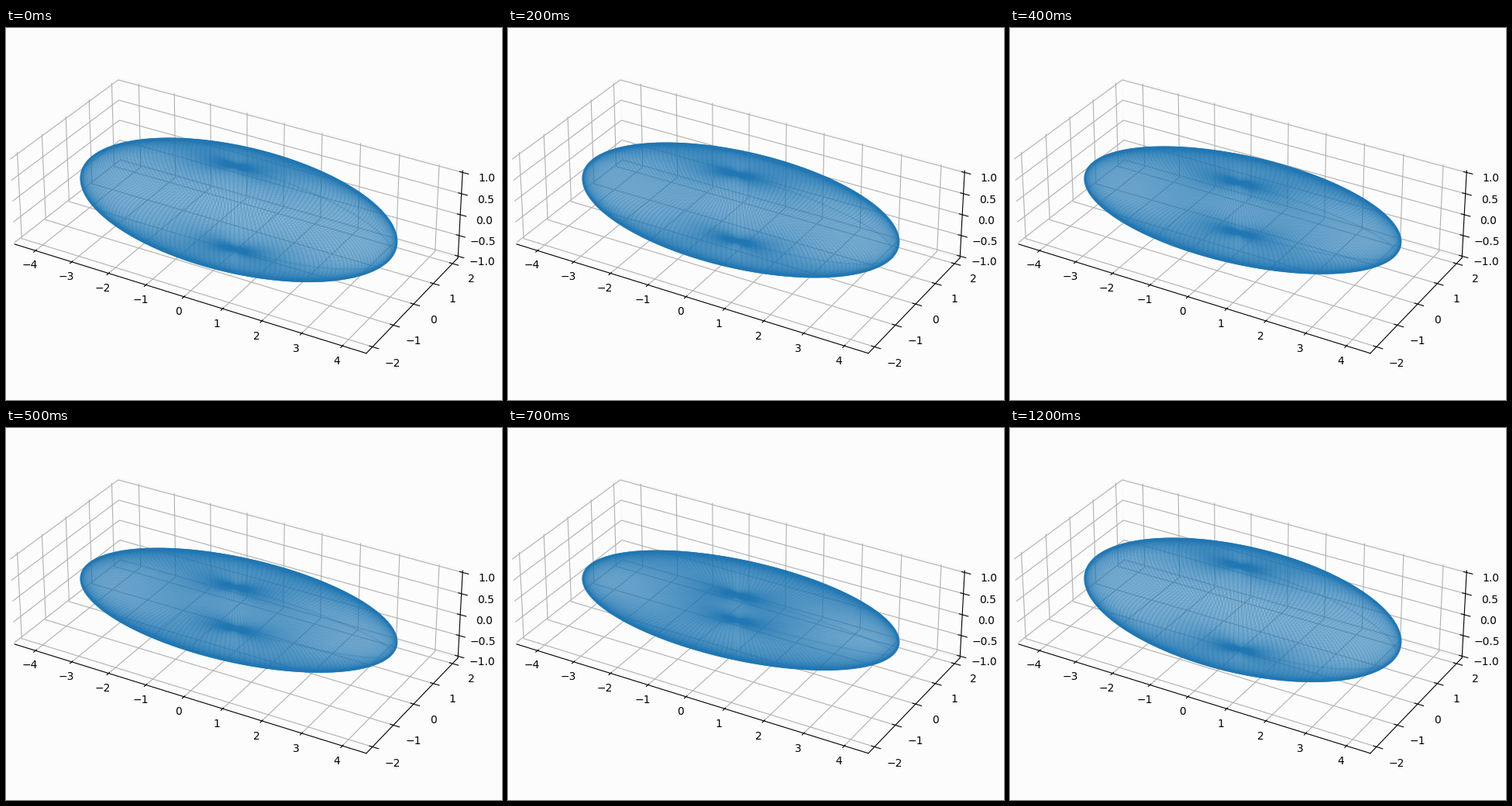
A matplotlib script that plays this animation: 640x480 px, repeating every 1250 ms.

```python
import numpy as np
import matplotlib.pyplot as plt
from matplotlib.animation import FuncAnimation

PAPER = "#fcfcfc"
AXES = (4, 2, 1)        # semi-axes and box proportions
FRAMES, STEP_MS = 25, 50
SHRINK_STEPS = 18       # then the flat shape is held until the last frame
PAD = 25 / 24

fig = plt.figure(figsize=(6.4, 4.8), dpi=100, facecolor=PAPER)
fig.subplots_adjust(left=0, right=0.9, bottom=-0.1, top=1.1)
ax = fig.add_subplot(projection="3d", facecolor=PAPER)
ax.view_init(elev=30, azim=-60)
ax.set_box_aspect(AXES)
ax.set_xlim(-4.4 * PAD, 4.4 * PAD)
ax.set_ylim(-2.2 * PAD, 2.2 * PAD)
ax.set_zlim(-PAD, PAD)
ax.set_xticks(np.arange(-4, 5))
ax.set_yticks(np.arange(-2, 3))
ax.set_zticks(np.arange(-1, 1.5, 0.5))
for axis in (ax.xaxis, ax.yaxis, ax.zaxis):
    axis.pane.set_facecolor(PAPER)
    axis.pane.set_edgecolor("#f2f2f2")

u = np.linspace(0, 2 * np.pi, 200)
v = np.linspace(0, np.pi, 200)
x = AXES[0] * np.outer(np.cos(u), np.sin(v))
y = AXES[1] * np.outer(np.sin(u), np.sin(v))
z = AXES[2] * np.outer(np.ones_like(u), np.cos(v))

mesh = None


def height(frame):
    if frame == FRAMES - 1:
        return 1.0
    return 1 - 0.05 * min(frame, SHRINK_STEPS)


def update(frame):
    global mesh
    if mesh is not None:
        mesh.remove()
    mesh = ax.plot_wireframe(x, y, height(frame) * z, rstride=1, cstride=1,
                             color="#1f77b4", alpha=0.2)
    return [mesh]


anim = FuncAnimation(fig, update, frames=FRAMES, interval=STEP_MS,
                     init_func=lambda: [], repeat=True, repeat_delay=0)
plt.show()
```
